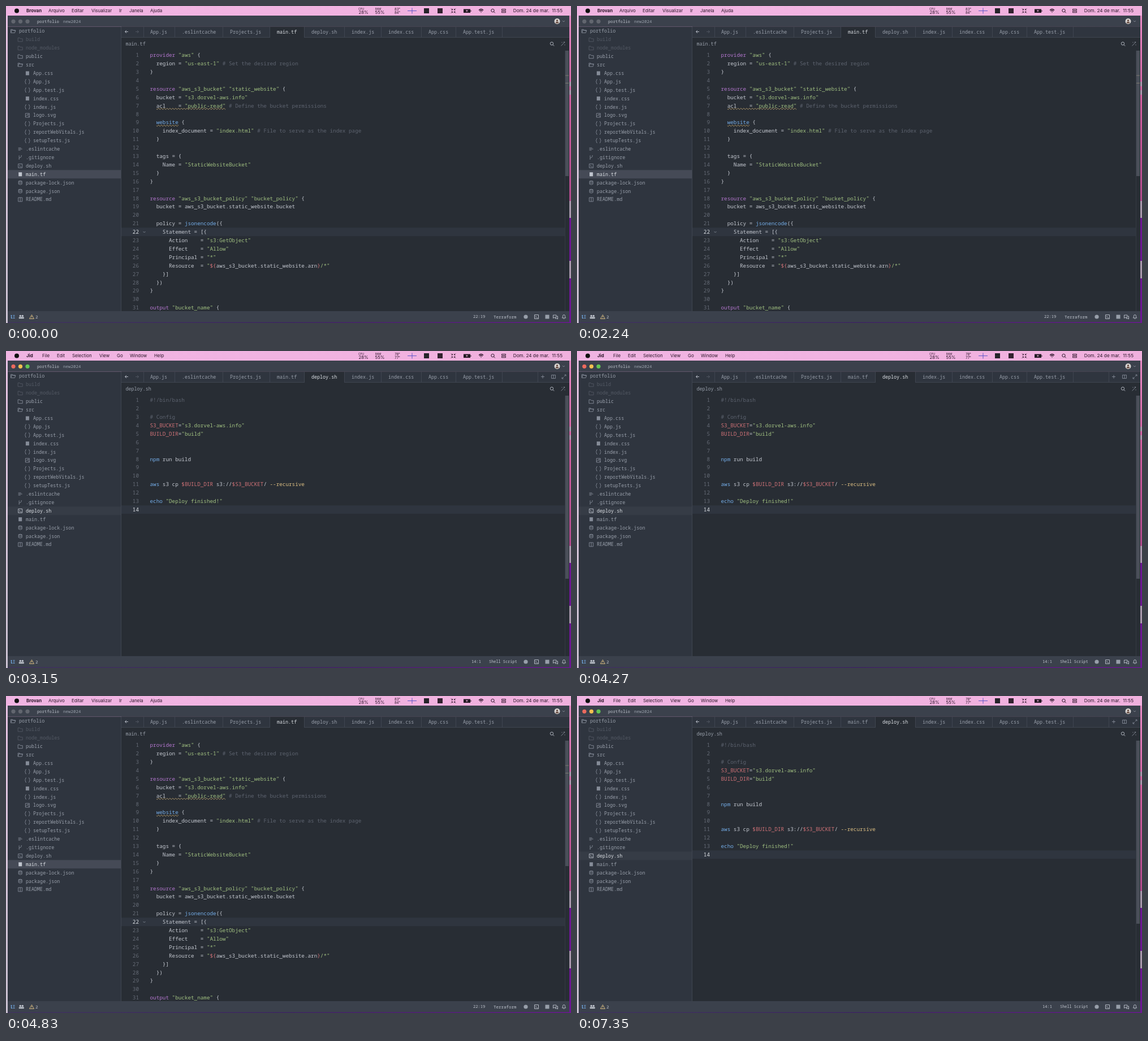
Animation, 999 px wide and 561 px high, one loop 8000 ms. Source, as an HTML page with a canvas:

```html
<!DOCTYPE html>
<html lang="en">
<head>
<meta charset="utf-8">
<title>Editor tabs</title>
<style>
html, body { margin: 0; width: 100%; height: 100%; overflow: hidden; }
canvas { display: block; }
</style>
</head>
<body>
<canvas id="stage" width="999" height="561"></canvas>
<script>
const ctx = document.getElementById('stage').getContext('2d');
const LOOP = 8000, ROW = 14.9, CHAR = 5.58, CODE_X = 254.5;
const MONO = '"Noto Sans Mono", monospace', SANS = 'Inter, sans-serif';

// Spans in ms during which the script tab is shown, and the editor has focus
const SCRIPT_SPANS = [[70, 910], [1610, 1820], [2310, 4760], [7350, LOOP]];
const FOCUS_SPANS = [[70, 980], [1680, 1960], [2380, 4830], [7350, LOOP]];

const color = {
  title: '#3b414c', panel: '#2f353f', editor: '#282d34', border: '#3f4550',
  bright: '#dce0e5', text: '#c0c5ce', muted: '#989faa', icon: '#858c98', faint: '#535964',
  ink: '#2b1428', comment: '#5d636f', keyword: '#b477cf', fn: '#74ade8', variable: '#d07277',
  string: '#a1c181', option: '#dfc184', plain: '#c4c8d0', warn: '#d9b878',
};
const TOKENS = new RegExp([
  '(?<comment>#.*)',
  '(?<string>"[^"$]*"|"(?=\\$)|/\\*")',
  '(?<keyword>^(?:provider|resource|output)\\b)',
  '(?<fn>\\b(?:jsonencode|website)\\b|^(?:npm|aws|echo)\\b)',
  '(?<variable>\\$\\{|\\}(?=/)|\\$?\\b[A-Z0-9]+_[A-Z]+\\b)',
  '(?<option>--\\w+)',
  '(?<plain>\\w+|\\S)',
].join('|'), 'g');

const files = {
  terraform: {
    name: 'main.tf', row: 17, line: 22, thumb: 301, selection: '#454a56',
    position: ['22:19', 826], language: ['Terraform', 862, 7.5],
    code: `provider "aws" {
  region = "us-east-1" # Set the desired region
}

resource "aws_s3_bucket" "static_website" {
  bucket = "s3.dorvel-aws.info"
  acl    = "public-read" # Define the bucket permissions

  website {
    index_document = "index.html" # File to serve as the index page
  }

  tags = {
    Name = "StaticWebsiteBucket"
  }
}

resource "aws_s3_bucket_policy" "bucket_policy" {
  bucket = aws_s3_bucket.static_website.bucket

  policy = jsonencode({
    Statement = [{
      Action    = "s3:GetObject"
      Effect    = "Allow"
      Principal = "*"
      Resource  = "\${aws_s3_bucket.static_website.arn}/*"
    }]
  })
}

output "bucket_name" {`.split('\n'),
  },
  script: {
    name: 'deploy.sh', row: 16, line: 14, thumb: 403, selection: '#363c46',
    position: ['14:1', 823], language: ['Shell Script', 854, 6.9],
    code: `#!/bin/bash

# Config
S3_BUCKET="s3.dorvel-aws.info"
BUILD_DIR="build"


npm run build


aws s3 cp $BUILD_DIR s3://$S3_BUCKET/ --recursive

echo "Deploy finished!"
`.split('\n'),
  },
};

// depth, icon, name
const tree = [
  [0, 'open', 'portfolio'], [1, 'folder', 'build'], [1, 'folder', 'node_modules'],
  [1, 'folder', 'public'], [1, 'open', 'src'], [2, 'block', 'App.css'],
  [2, 'braces', 'App.js'], [2, 'braces', 'App.test.js'], [2, 'block', 'index.css'],
  [2, 'braces', 'index.js'], [2, 'image', 'logo.svg'], [2, 'braces', 'Projects.js'],
  [2, 'braces', 'reportWebVitals.js'], [2, 'braces', 'setupTests.js'],
  [1, 'lines', '.eslintcache'], [1, 'branch', '.gitignore'], [1, 'terminal', 'deploy.sh'],
  [1, 'block', 'main.tf'], [1, 'data', 'package-lock.json'], [1, 'data', 'package.json'],
  [1, 'book', 'README.md'],
];
const tabs = [['App.js', 255], ['.eslintcache', 311], ['Projects.js', 396], ['main.tf', 479],
  ['deploy.sh', 540], ['index.js', 611], ['index.css', 676], ['App.css', 747], ['App.test.js', 808]];
const menus = {
  focused: [['Jid', 36], ['File', 64], ['Edit', 90], ['Selection', 117], ['View', 165],
    ['Go', 196], ['Window', 219], ['Help', 262]],
  blurred: [['Brovan', 36], ['Arquivo', 75], ['Editar', 116], ['Visualizar', 151], ['Ir', 200],
    ['Janela', 218], ['Ajuda', 255]],
};

// Stroked icons, centred on the origin
const icons = {
  folder: 'M-4-3h3l1 1.5h4v5h-8z',
  open: 'M-4 3v-6h3l1 1.5h3v1.5M-4 3l1.5-4.5h7l-1.5 4.5z',
  braces: 'M-2-4q-1.5 0-1.5 1.5v1.5l-1 1 1 1v1.5q0 1.5 1.5 1.5M2-4q1.5 0 1.5 1.5v1.5l1 1-1 1v1.5q0 1.5-1.5 1.5',
  image: 'M-3.5-3.5h7v7h-7zM-3.5 2l3-3 4 4M1-2h1v1h-1z',
  lines: 'M-3.5-2h5M-3.5 0h7M-3.5 2h4',
  branch: 'M-2-3.5v5M-2 1.5v2M2-3v1q0 2-4 3M1.5-3.5h1M-2.5 3h1',
  terminal: 'M-3.5-3.5h7v7h-7zM-1.8-1.5l1.5 1.5-1.5 1.5M.3 1.7h1.7',
  data: 'M-3-2.5q3-2 6 0v5q-3 2-6 0zM-3-2.5q3 2 6 0M-3 0q3 2 6 0',
  book: 'M-3.5-3.5h7v7h-7zM0-3.5v7',
  search: 'M2.2-.5a2.7 2.7 0 1 0-5.4 0 2.7 2.7 0 1 0 5.4 0M1.4 1.5l2.3 2.3',
  wand: 'M-3.5 3.5l5-5M2-4v2.5M.8-2.8h2.5M-2-3.3v1.5M3 1v1.5',
  back: 'M3 0h-5.5M0-2.5l-2.5 2.5 2.5 2.5',
  forward: 'M-3 0h5.5M0-2.5l2.5 2.5-2.5 2.5',
  chevron: 'M-2-1l2 2 2-2',
  plus: 'M-3 0h6M0-3v6',
  split: 'M-3.5-3h7v6h-7zM0-3v6',
  expand: 'M.5-.5l3-3M1-3.5h2.5v2.5M-.5.5l-3 3M-1 3.5h-2.5v-2.5',
  corners: 'M-4-4l2.5 2.5v-2M-1.5-1.5h-2M4-4l-2.5 2.5v-2M1.5-1.5h2M-4 4l2.5-2.5v2M-1.5 1.5h-2M4 4l-2.5-2.5v2M1.5 1.5h2',
  cross: 'M-8 0h16M0-5v10',
  wifi: 'M-4-1q4-4 8 0M-2.5.7q2.5-2.4 5 0M-.6 2.4h1.2',
  toggles: 'M-3.5-3h7v2.3h-7zM-3.5.8h7v2.3h-7z',
  warning: 'M0-3.5l4 7h-8zM0-1v2M0 2v.5',
  list: 'M-3.5-2.5h2M.5-2.5h3M-2.5-2v4.5h2M.5 0h3M.5 2.5h3',
  chat: 'M-4-3h5.5v4h-3.5l-2 1.5zM2.5-1h1.5v5l-1.5-1h-3v-1.5',
  bell: 'M-3.2 2q1.2-1 1.2-3.5 0-2 2-2t2 2q0 2.5 1.2 3.5zM-.7 3.5h1.4',
};
for (const name in icons) icons[name] = new Path2D(icons[name]);

function box(x, y, w, h, fill) {
  ctx.fillStyle = fill;
  ctx.fillRect(x, y, w, h);
}
function dot(x, y, r, fill) {
  ctx.fillStyle = fill;
  ctx.beginPath();
  ctx.arc(x, y, r, 0, 7);
  ctx.fill();
}
function person(x, y, fill) {
  dot(x, y - 1.6, 1.7, fill);
  box(x - 2.5, y + 0.6, 5, 2.6, fill);
}
function label(str, x, y, fill, size = 8.4, family = MONO, weight = 400, align = 'left') {
  ctx.font = `${weight} ${size}px ${family}`;
  ctx.textAlign = align;
  ctx.fillStyle = fill;
  ctx.fillText(str, x, y + size * 0.35);
}
function icon(name, x, y, stroke = color.icon, width = 0.9) {
  if (name === 'block') return box(x - 3, y - 3.5, 6, 7, stroke);
  ctx.save();
  ctx.translate(x, y);
  ctx.strokeStyle = stroke;
  ctx.lineWidth = width;
  ctx.stroke(icons[name]);
  ctx.restore();
}
function gradient(x, y, ...stops) {
  const g = ctx.createLinearGradient(0, 0, x, y);
  stops.forEach((c, i) => g.addColorStop(i / (stops.length - 1), c));
  return g;
}
function wave(x1, x2, y) {
  ctx.strokeStyle = color.warn;
  ctx.lineWidth = 0.8;
  ctx.beginPath();
  for (let x = x1; x <= x2; x += 0.5) ctx.lineTo(x, y + Math.sin((x - x1) * 1.25));
  ctx.stroke();
}

function drawDesktop() {
  box(0, 0, 999, 561, gradient(999, 0, '#f0b4e2', '#f1b3e1', '#f0b0dd'));
  box(0, 17, 3, 544, gradient(0, 561, '#e6c0e2', '#d7c4da', '#c9c0d0'));
  box(996, 17, 3, 330, gradient(0, 345, '#e88fc8', '#cf5f9f', '#b04a8c'));
  box(996, 345, 3, 216, '#6d1694');
  for (const [y, h] of [[134, 8], [149, 8], [345, 30], [451, 31]]) box(996, y, 3, h, '#a898ac');
  box(3, 559, 996, 2, gradient(999, 0, '#40345e', '#3d2560', '#6d1694'));
}

function drawMenuBar(focused) {
  dot(19, 8.5, 4, '#111');
  menus[focused ? 'focused' : 'blurred'].forEach(([name, x], i) =>
    label(name, x, 8.5, color.ink, 7.9, SANS, i ? 400 : 700));
  const temps = focused ? ['78°', '77°'] : ['83°', '84°'];
  label('CPU', 628, 5, color.ink, 4.8, SANS, 400, 'center');
  label('28%', 632, 11, color.ink, 7.8, SANS, 400, 'center');
  label('RAM', 658, 5, color.ink, 4.8, SANS, 400, 'center');
  label('55%', 661, 11, color.ink, 7.8, SANS, 400, 'center');
  temps.forEach((t, i) => label(t, 692, 5.5 + i * 6, color.ink, 6, SANS, 400, 'center'));
  icon('cross', 718, 8.5, '#5350c8');
  box(739, 4, 9, 9, '#26232a');
  box(763, 4, 9, 9, '#32222f');
  icon('corners', 791, 8.5, color.ink);
  box(809, 5.5, 12, 6.5, '#241a24');
  box(821.5, 7.5, 1, 2.5, '#241a24');
  label('+', 815, 8.5, '#f3b5df', 7, SANS, 700, 'center');
  icon('wifi', 840, 8.5, color.ink, 1.2);
  icon('search', 861, 8.5, color.ink, 1);
  icon('toggles', 880, 8.5, color.ink);
  label('Dom. 24 de mar.  11:55', 984, 8.5, color.ink, 8.2, SANS, 400, 'right');
}

function drawTitleBar(focused) {
  box(3, 17, 993, 19.5, color.title);
  const lights = focused ? ['#ec6a5e', '#f4bf4f', '#61c554'] : Array(3).fill('#62666f');
  lights.forEach((c, i) => dot(13 + i * 12.5, 27.3, 3.6, c));
  label('portfolio', 55, 27, color.text, 7.2, MONO, 500);
  label('new2024', 101, 27, color.muted, 7.5);
  dot(974.5, 27, 5, '#d8d5d2');
  person(974.5, 27.4, '#6b5147');
  icon('chevron', 986, 27);
}

function drawSidebar(file) {
  box(3, 36.5, 200, 503.5, color.panel);
  box(3, 37 + file.row * ROW, 200, ROW, file.selection);
  tree.forEach(([depth, glyph, name], i) => {
    const y = 44.5 + i * ROW, x = 12.5 + depth * 12.7;
    const ignored = i === 1 || i === 2, selected = i === file.row;
    icon(glyph, x, y, ignored ? color.faint : selected ? color.text : color.icon);
    const fill = ignored ? color.faint : selected ? color.bright : color.muted;
    label(name, [23, 35, 48][depth], y, fill);
  });
  box(203, 36.5, 1, 503.5, color.border);
}

function drawTabs(file, focused) {
  box(204, 36.5, 792, 19, color.panel);
  box(204, 55, 792, 1, color.border);
  icon('back', 213, 45.5, color.text);
  icon('forward', 232, 45.5, color.faint);
  box(243, 37, 1, 18, color.border);
  tabs.forEach(([name, x], i) => {
    const left = x - 12, right = i < tabs.length - 1 ? tabs[i + 1][1] - 13 : 877;
    const active = name === file.name;
    if (active) box(left, 37, right - left, 19, color.editor);
    box(right, 37, 1, 18, color.border);
    label(name, x, 46, active ? color.bright : color.muted);
  });
  if (focused) {
    box(940, 37, 1, 18, color.border);
    icon('plus', 949, 45.5);
    icon('split', 968, 45.5);
    icon('expand', 986.5, 45.5);
  }
  label(file.name, 211.5, 67, color.muted);
  icon('search', 965.5, 67, color.text);
  icon('wand', 985, 67);
}

function drawCode(file) {
  box(204, 79.5 + (file.line - 1) * ROW, 784, ROW, color.panel);
  file.code.forEach((line, i) => {
    const y = 87 + i * ROW;
    const current = i + 1 === file.line;
    label(i + 1, 235, y, current ? color.bright : '#656b76', 9.3, MONO, 400, 'right');
    for (const match of line.matchAll(TOKENS)) {
      const kind = Object.keys(match.groups).find(k => match.groups[k]);
      label(match[0], CODE_X + match.index * CHAR, y, color[kind], 9.3);
    }
  });
  box(988, 79, 1, 461, '#343943');
  box(989, 79, 6, file.thumb - 79, '#4a4f59');
  if (file === files.terraform) {
    wave(266, 388, 182);
    wave(266, 305, 211.8);
    icon('chevron', 244.5, 400);
    for (const y of [122.5, 136]) box(989, y, 6, 1, '#7d7a70');
  }
}

function drawStatusBar(file) {
  const [position, positionX] = file.position;
  const [language, languageX, size] = file.language;
  box(3, 540, 993, 19.5, color.title);
  icon('list', 12, 550, color.fn, 1.2);
  person(25.3, 550, color.text);
  person(29.3, 550, color.text);
  icon('warning', 45.5, 550, color.option);
  label('2', 52, 550, color.text, 7.6);
  label(position, positionX, 550, color.text, 7.1);
  label(language, languageX, 550, color.text, size);
  dot(919, 550, 3.6, color.muted);
  icon('terminal', 938, 550, color.text);
  box(947.5, 544, 1, 12, color.border);
  box(953.5, 546.5, 7, 7, color.muted);
  icon('chat', 971.5, 550, color.text);
  icon('bell', 986.5, 550, color.text);
}

const within = (spans, t) => spans.some(([from, to]) => t >= from && t < to);

function frame() {
  const t = performance.now() % LOOP;
  const file = within(SCRIPT_SPANS, t) ? files.script : files.terraform;
  const focused = within(FOCUS_SPANS, t);
  drawDesktop();
  drawMenuBar(focused);
  drawTitleBar(focused);
  box(204, 36.5, 792, 503.5, color.editor);
  drawSidebar(file);
  drawTabs(file, focused);
  ctx.save();
  ctx.beginPath();
  ctx.rect(204, 79, 792, 461);
  ctx.clip();
  drawCode(file);
  ctx.restore();
  drawStatusBar(file);
  requestAnimationFrame(frame);
}
frame();
</script>
</body>
</html>
```
